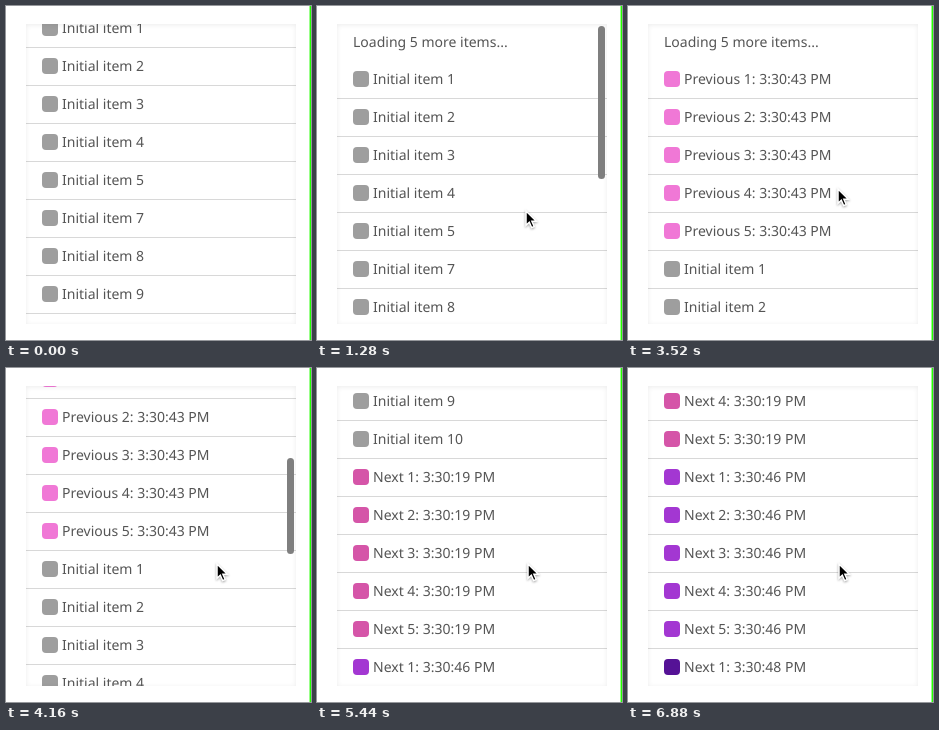
Write an HTML page that moves like this. It is 305 px wide and 334 px high and loops after 7.04 s.

```html
<!DOCTYPE html>
<html lang="en">
<head>
<meta charset="utf-8">
<title>Infinite list</title>
<style>
  html, body { margin: 0; width: 100%; height: 100%; overflow: hidden; background: #fff; }
  body { position: relative; font: 14px/37px "Noto Sans", "Open Sans", sans-serif; color: #555; text-rendering: geometricPrecision; }
  .edge { position: absolute; left: 303px; top: 0; width: 2px; height: 100%; background: linear-gradient(90deg, #9f8 50%, #2f0 50%); }
  .list { position: absolute; left: 20px; top: 18px; width: 270px; height: 300px; overflow: hidden; }
  .list::after { content: ""; position: absolute; inset: 0; box-shadow: inset 0 1px 5px rgba(0, 0, 0, .08); }
  .rows { position: absolute; left: 0; top: 0; width: 100%; }
  .row { position: relative; height: 37px; padding-left: 36px; border-bottom: 1px solid #d8d8d8; white-space: pre; }
  .row i { position: absolute; left: 16px; top: 10px; width: 16px; height: 16px; border-radius: 4px; }
  .load { height: 37px; padding-left: 16px; white-space: pre; }
  .bar { position: absolute; left: 261px; width: 7px; border-radius: 4px; background: #7f7f7f; z-index: 1; }
  .cursor { position: absolute; left: 0; top: 0; overflow: visible; filter: drop-shadow(0 1px 1px rgba(0, 0, 0, .35)); }
</style>
</head>
<body>
<div class="edge"></div>
<div class="list"><div class="rows"></div><div class="bar"></div></div>
<svg class="cursor" width="12" height="18">
  <path d="M0 0V14.2L3.3 11.2L5.6 16.6L8.2 15.5L5.9 10.2H10.4Z" fill="#000" stroke="#fff" stroke-width="1.5"/>
</svg>
<script>
const LOOP = 7040, TICK = 160, VIEW = 300, ROW = 38, LOAD = 37;
const LOAD_DELAY = 960, BAR_DELAY = 640;
const $ = s => document.querySelector(s);
const rows = $('.rows'), bar = $('.bar'), cursor = $('.cursor');

const batch = (label, time, color) =>
  [1, 2, 3, 4, 5].map(n => [`${label} ${n}: 3:30:${time} PM`, color]);

const initial = [1, 2, 3, 4, 5, 7, 8, 9, 10].map(n => ['Initial item ' + n, '#9e9e9e']);
const previous = [batch('Previous', 43, '#f078d6'), batch('Previous', 45, '#f6a0e2')];
const next = [batch('Next', 19, '#d555a8'), batch('Next', 46, '#a337d2'), batch('Next', 48, '#551296')];

// Each scroll gesture runs into an edge and makes that side load a batch.
const gestures = [
  { from: 0,    to: 1440, start: 14,  end: -9,  power: 4 },
  { from: 2560, to: 2880, start: 153, end: 0,   power: 1 },
  { from: 3840, to: 4480, start: 153, end: 649, power: 3 },
  { from: 5600, to: 5920, start: 649, end: 839, power: 1 }
];

const ramp = (t, a, b) => Math.min(1, Math.max(0, (t - a) / (b - a)));
const goesUp = g => g.end < g.start;

const loader = '<div class="load">Loading 5 more items...</div>';
const rowHtml = ([text, color]) => `<div class="row"><i style="background:${color}"></i>${text}</div>`;

function show(t) {
  const loaded = gestures.filter(g => t >= g.to + LOAD_DELAY);
  const ups = loaded.filter(goesUp).length;
  const items = [
    ...previous.slice(0, ups).reverse().flat(),
    ...initial,
    ...next.slice(0, 1 + loaded.length - ups).flat()
  ];

  const g = gestures.findLast(g => g.from <= t);
  const p = ramp(t, g.from, g.to) ** g.power;
  let scroll = Math.max(0, Math.round(g.start + (g.end - g.start) * p));
  // Keep the visible rows in place when a batch replaces the top loader.
  if (goesUp(g) && loaded.includes(g)) scroll += 5 * ROW - LOAD;

  const atTop = scroll === 0;
  const atBottom = scroll > items.length * ROW - VIEW;
  rows.innerHTML = (atTop ? loader : '') + items.map(rowHtml).join('') + (atBottom ? loader : '');
  rows.style.top = -scroll + 'px';

  const height = items.length * ROW + (atTop || atBottom ? LOAD : 0);
  const size = 290 * VIEW / height;
  bar.style.height = size + 'px';
  bar.style.top = 2 + (296 - size) * scroll / (height - VIEW) + 'px';
  bar.style.opacity = t > g.from && t < g.to + BAR_DELAY ? 1 : 0;

  const up = ramp(t, 2080, 2560), down = ramp(t, 3840, 4000);
  cursor.style.display = t > 0 ? '' : 'none';
  cursor.style.transform = `translate(${209 + up + down}px, ${205 - 22 * up + 13 * down}px)`;
}

let shown;
function frame() {
  const t = Math.floor(performance.now() % LOOP / TICK) * TICK;
  if (t !== shown) show(shown = t);
  requestAnimationFrame(frame);
}
frame();
</script>
</body>
</html>
```
